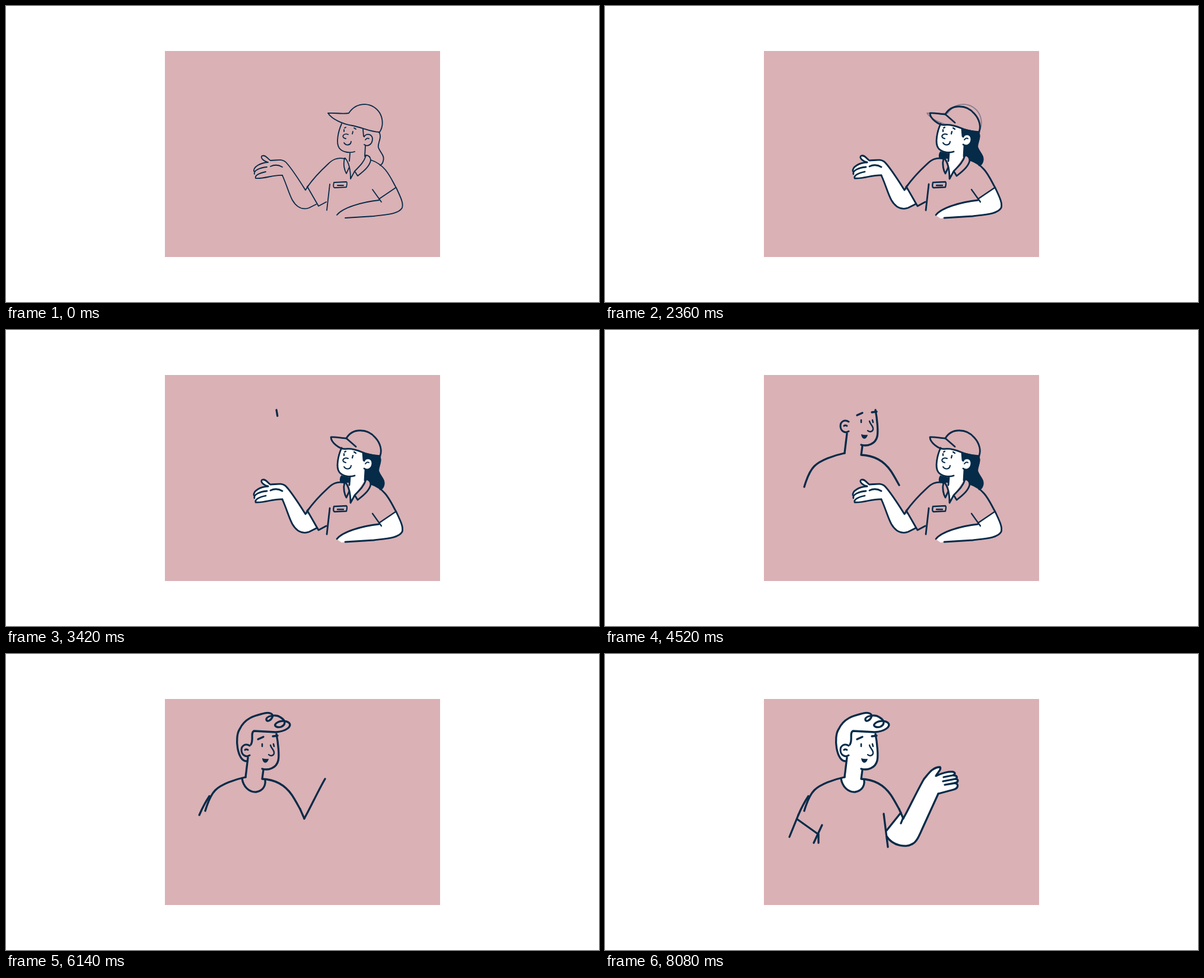
These frames come from a looping animation (1000x500 px, 8.1 s). An HTML page:

```html
<!DOCTYPE html>
<html lang="en">
<head>
<meta charset="utf-8">
<title>Drawing in progress</title>
<style>
  html, body { margin: 0; width: 100%; height: 100%; overflow: hidden; background: #fff; }
  svg { display: block; width: 100%; height: 100%; }
  .line { fill: none; stroke: #052b49; stroke-linecap: round; stroke-linejoin: round; }
</style>
</head>
<body>
<svg id="stage" viewBox="0 0 1000 500"></svg>
<script>
const LOOP = 8100;
const NAVY = '#052b49', PINK = '#dab1b5', DARK = '#151914';
const stage = document.getElementById('stage');
const steps = [];

function add(parent, tag, attrs = {}) {
  const el = document.createElementNS('http://www.w3.org/2000/svg', tag);
  for (const key in attrs) el.setAttribute(key, attrs[key]);
  return parent.appendChild(el);
}

const ramp = (t, from, to) => Math.min(1, Math.max(0, (t - from) / (to - from)));

function line(parent, d, width) {
  return add(parent, 'path', { d, class: 'line', 'stroke-width': width });
}

// Draws each subpath in turn between the two times.
function ink(parent, d, from, to, width = 2.8) {
  const parts = d.match(/M[^M]+/g), span = (to - from) / parts.length;
  parts.forEach((part, i) => {
    const path = line(parent, part, width);
    path.setAttribute('pathLength', 1);
    const start = from + i * span;
    steps.push(t => {
      const p = ramp(t, start, start + span);
      path.style.display = p > 0 ? '' : 'none';
      path.style.strokeDasharray = p < 1 ? `${p} 2` : 'none';
    });
  });
}

function fill(parent, d, at, color = '#fff') {
  const path = add(parent, 'path', { d, fill: color });
  steps.push(t => { path.style.display = t >= at ? '' : 'none'; });
}

const paper = add(stage, 'rect', { x: 268, y: 76, width: 464, height: 348 });
const woman = add(stage, 'g'), man = add(stage, 'g');

// Woman: outlines shared by the pencil sketch and the inked drawing
const W = {
  face: 'M566,199 C560,212 556,232 562,240 C567,247 580,249 588,246',
  ear: 'M602,208 L603,220 M604,221 C606,215 617,215 618,224 C618,235 609,238 604,234',
  neck: 'M606,236 L605,254 M580,249 L579,262',
  collar: 'M571,257 C568,268 571,278 574,283 L579,272 M572,257 C578,264 581,275 581,292 L588,279 L593,287 C606,277 613,270 615,261 C615,255 611,252 607,252 C605,262 597,270 588,279',
  hair: 'M629,213 C635,222 626,232 628,239 C631,248 639,252 636,262 C635,267 633,268 631,269',
  shoulder: 'M571,258 C558,255 550,260 543,267 C530,279 517,293 508,306',
  sleeve: 'M508,305 L527,338 L540,331 M546,301 L541,345',
  hand: 'M442,264 C434,262 428,256 432,253 C438,251 441,258 446,261 C455,261 466,257 473,265 C483,276 493,292 505,311 L510,303 M442,264 C428,265 417,272 418,279 M440,272 C428,273 417,278 419,284 M438,280 C428,282 419,286 421,291 C437,292 450,285 466,286 M446,271 Q456,266 466,272',
  forearm: 'M466,286 C474,304 477,317 483,328 C490,340 500,345 511,341 L523,335',
  rightArm: 'M615,260 C642,269 649,292 658,307 C664,320 671,333 668,341 C662,351 645,352 620,355 L572,358',
  cuff: 'M657,307 L629,326 M618,310 L633,331',
  rest: 'M629,328 C600,331 567,341 558,353',
  eyes: 'M570,209 L570,212 M585,212 L584,216 M571,206 L573,205 M587,206 L590,208',
  nose: 'M577,217 C569,214 564,222 573,224',
  smile: 'M570,231 C573,236 581,236 582,229 M606,226 Q609,222 612,224',
  tag: 'M554,298 L574,297 Q576,298 574,306 L554,307 Q551,306 553,298 M559,303 L569,303'
};
const sketchCap = 'M578,181 C592,160 620,162 631,182 C637,194 635,206 630,213 M578,181 C566,183 555,180 543,181 C550,192 570,200 584,202 C600,205 615,213 630,213';

fill(woman, 'M442,264 C428,259 428,252 435,253 L446,261 C455,261 466,257 473,265 L505,311 L511,311 L523,335 C506,345 492,342 483,328 L466,286 C450,285 437,292 421,291 L417,276 C418,269 429,266 442,264Z', 330);
fill(woman, 'M657,307 L629,327 C600,331 567,341 557,353 L566,359 L572,358 C620,354 669,355 668,339 Q667,324 657,307Z', 500);
fill(woman, 'M566,199 C560,212 556,232 562,240 C567,248 573,248 580,248 L579,262 L582,288 L605,254 L606,236 C616,238 619,230 618,222 C615,215 606,215 604,221 L602,207 C590,200 575,201 566,199Z', 680);

const sketch = add(woman, 'g');
for (const d of [...Object.values(W), sketchCap]) line(sketch, d, 1.8);

fill(woman, 'M601,206 L631,213 C636,222 626,232 629,239 C632,248 641,252 638,263 Q636,269 632,270 Q625,263 615,261 Q613,252 606,252 L606,236 C621,238 620,214 607,217 L603,221Z', 2250, NAVY);
fill(woman, 'M566,246 L580,249 L579,258 L565,258 Q562,252 566,246Z', 2300, NAVY);

ink(woman, W.face, 860, 950);
ink(woman, W.ear, 950, 1020);
ink(woman, W.neck, 1020, 1070);
ink(woman, W.collar, 1070, 1180);
ink(woman, W.hair, 1180, 1235);
ink(woman, 'M566,247 C563,251 564,254 565,257', 1235, 1255);
ink(woman, W.hand, 1280, 1460);
ink(woman, W.forearm, 1460, 1540);
ink(woman, W.rest, 1540, 1590);
ink(woman, W.rightArm, 1590, 1680);
ink(woman, W.shoulder, 1700, 1770);
ink(woman, W.sleeve, 1770, 1850);
ink(woman, W.cuff, 1850, 1910, 2.2);
ink(woman, W.eyes, 1910, 1970, 2.2);
ink(woman, W.nose + W.smile, 1970, 2030, 2);
ink(woman, 'M574,183 C584,165 610,166 623,182 C632,192 634,204 631,212 M574,183 C566,183 556,180 548,181 C548,190 562,201 572,201 C588,199 602,208 614,211 L631,213 M574,183 L590,197', 2030, 2200);
ink(woman, W.tag, 2200, 2250, 2.4);

// Man: fills first, then ink
fill(man, 'M406,181 C390,182 385,140 394,127 C403,108 420,104 432,101 C444,97 452,101 449,106 C454,103 460,104 465,108 Q470,111 469,114 C489,117 476,132 455,132 L456,134 C459,150 461,172 459,180 C456,193 442,197 434,194 L433,211 L437,213 C438,222 434,231 422,233 C410,234 400,224 398,210 L404,208Z', 7280);
fill(man, 'M503,278 C513,260 529,226 538,211 C545,203 552,191 565,191 C568,195 560,201 558,206 C568,200 580,198 589,200 L595,211 L595,222 Q593,229 562,236 L536,293 C525,333 496,331 475,308 L474,298 L499,268Z', 7420);

const MAN_WIDTH = 3.3;
const draw = (d, from, to, width = MAN_WIDTH) => ink(man, d, from, to, width);

draw('M456,135 C459,150 461,172 459,180 C456,193 442,197 432,194', 3400, 3560);
draw('M446,154 C447,160 453,162 452,168 C451,172 446,173 443,170', 3580, 3660, 2.4);
draw('M432,152 L432,156 M451,152 L452,156', 3680, 3740, 2.6);
draw('M425,144 L434,140 M450,139 L458,138', 3760, 3840);
fill(man, 'M432,176 Q437,178 443,177 C441,186 433,186 432,176Z', 3900, NAVY);
draw('M411,155 C404,150 397,155 397,162 C397,171 405,175 411,171 M403,162 Q405,160 408,162', 3960, 4110, 3);
draw('M408,175 L404,208', 4150, 4210);
draw('M404,208 C385,212 363,220 353,230 C346,237 341,248 336,265', 4210, 4340);
draw('M434,196 L432,211 C455,212 471,222 482,238 C488,247 492,255 496,262', 4350, 4510);
draw('M343,240 C337,249 331,260 326,272', 4600, 4680);
draw('M496,262 L503,278', 4680, 4740);
draw('M406,181 C390,182 385,140 394,127 C403,108 420,104 432,101 C444,97 452,101 449,107 C446,113 440,115 439,111 C438,105 455,101 463,107 C473,113 471,120 464,123 C458,125 452,122 454,119 C458,113 470,111 477,116 C484,123 470,131 455,132 L418,130 C412,133 418,145 413,153', 4760, 5350);
draw('M398,210 C400,224 410,234 422,233 C434,231 438,222 437,213', 5400, 5600);
draw('M503,278 C513,260 529,226 538,211', 5900, 6130);
draw('M538,211 C545,203 552,191 565,191 C568,195 560,201 558,206 C568,201 580,198 587,199 C592,201 590,204 586,205 L571,208 M588,205 C594,205 595,210 591,211 L570,215 M591,211 C597,211 596,217 590,218 L573,221 M590,218 C597,219 596,227 588,229 L562,236', 6170, 6570);
draw('M562,236 L536,293 C531,304 526,318 518,321', 6600, 6850);
draw('M518,321 C508,327 486,325 475,308', 6900, 6980);
draw('M499,268 L475,298 M503,276 L499,286', 6980, 7050);
draw('M470,270 L477,326', 7050, 7100);
draw('M326,272 L311,309', 7100, 7150);
draw('M324,279 L359,304 M366,289 L352,319 M360,304 L360,319', 7150, 7260);

steps.push(t => {
  const dark = t >= 2620 && t < 3100 || t >= 7600 && t < 7860;
  paper.setAttribute('fill', dark ? DARK : PINK);
  sketch.style.opacity = (1 - 0.62 * ramp(t, 80, 240)) * (1 - ramp(t, 2380, 2480));
  woman.style.opacity = 1 - ramp(t, 5700, 5880);
});

function render() {
  const t = performance.now() % LOOP;
  for (const step of steps) step(t);
  requestAnimationFrame(render);
}
render();
</script>
</body>
</html>
```
